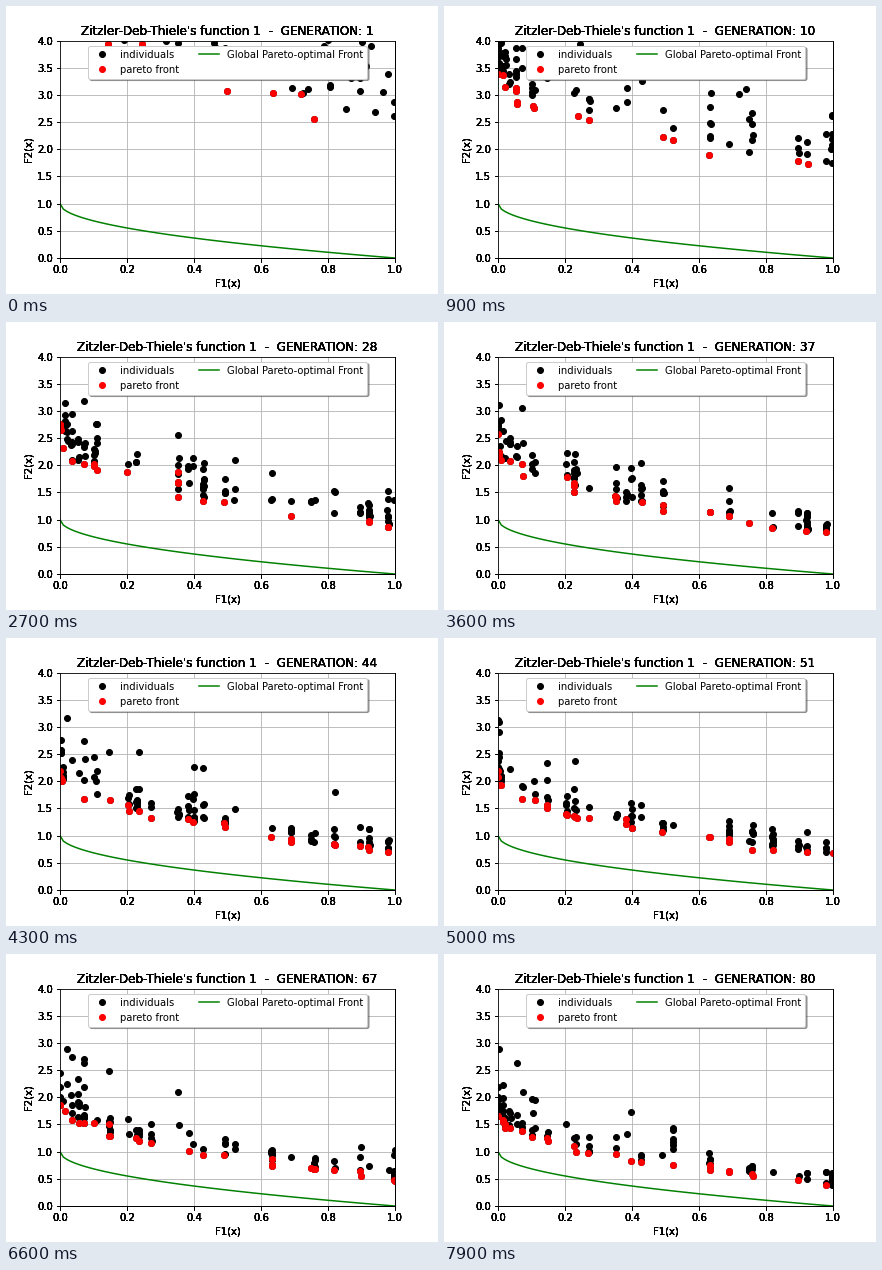
Write a matplotlib script that moves like this. It is 432 px wide and 288 px high and loops after 8000 ms.

```python
import numpy as np
import matplotlib.pyplot as plt
from matplotlib.animation import FuncAnimation

plt.rcParams.update({"font.family": "DejaVu Sans", "font.size": 10})
rng = np.random.default_rng(11)

GENERATIONS = 80
SIZE = 120
CHILDREN = 15
TITLE = "Zitzler-Deb-Thiele's function 1  -  GENERATION: {}"

# F1 values that many individuals share, seen as vertical stacks
GENES = np.array([0, 0.003, 0.008, 0.015, 0.022, 0.035, 0.055, 0.073, 0.102, 0.11,
                  0.147, 0.204, 0.228, 0.235, 0.272, 0.353, 0.383, 0.398, 0.428,
                  0.493, 0.523, 0.633, 0.69, 0.75, 0.76, 0.82, 0.897, 0.923,
                  0.98, 0.998])
PHASES = rng.uniform(0, 1, GENES.size)


def f2(x, g):
    """ZDT1 objective; g = 1 is the optimal front."""
    return g - np.sqrt(g * x)


def best_g(gen):
    return np.interp(gen, [1, 10, 19, 28, 37, 51, 67, 80],
                     [4.3, 3.15, 2.7, 2.3, 2.15, 1.93, 1.75, 1.6])


def is_front(x, y):
    """Mask of the points that no other point dominates."""
    mask = np.zeros(x.size, bool)
    best = np.inf
    for i in np.lexsort((y, x)):
        if y[i] < best:
            mask[i] = True
            best = y[i]
    return mask


def breed(gen, n):
    """Children on the currently popular genes, mostly near the best g."""
    weight = 0.25 + np.maximum(0, np.sin(2 * np.pi * (gen / 60 + PHASES)))
    x = rng.choice(GENES, n, p=weight / weight.sum())
    x = np.clip(x + rng.normal(0, 0.001, n), 0, 1)
    excess = rng.exponential(0.6 - 0.3 * x)
    return x, best_g(gen) + np.minimum(excess, 1.4)


def evolve():
    """Yield x, y and front mask of every generation."""
    x = rng.uniform(0, 1, SIZE)
    g = np.maximum(rng.normal(5.5, 0.48, SIZE), best_g(1))
    for gen in range(1, GENERATIONS + 1):
        if gen > 1:
            # The front survives; the worst of the rest tend to go
            score = g + rng.normal(0, 0.8, SIZE)
            score[is_front(x, f2(x, g))] = -np.inf
            worst = np.argsort(score)[-CHILDREN:]
            x[worst], g[worst] = breed(gen, CHILDREN)
        y = f2(x, g)
        yield x.copy(), y, is_front(x, y)


history = list(evolve())

fig = plt.figure(figsize=(6, 4), dpi=72, facecolor="white")


def make_axes():
    ax = fig.add_axes([0.125, 0.125, 0.775, 0.755])
    ax.set(xlim=(0, 1), ylim=(0, 4), xlabel="F1(x)", ylabel="F2(x)",
           xticks=np.linspace(0, 1, 6), yticks=np.linspace(0, 4, 9))
    return ax


# Stacked axes give the labels their heavy look
layers = [make_axes() for _ in range(6)]
ax = layers[-1]
ax.grid(True)
dots, = ax.plot([], [], "ko", label="individuals")
front, = ax.plot([], [], "ro", label="pareto front")
curve = np.linspace(0, 1, 100)
ax.plot(curve, f2(curve, 1), "g", label="Global Pareto-optimal Front")
ax.legend(loc="upper center", ncol=2, fancybox=True, shadow=True)


def update(i):
    x, y, mask = history[i]
    dots.set_data(x, y)
    front.set_data(x[mask], y[mask])
    for layer in layers:
        layer.set_title(TITLE.format(i + 1))
    return dots, front


anim = FuncAnimation(fig, update, frames=GENERATIONS, interval=100,
                     repeat=True, repeat_delay=0)
plt.show()
```
